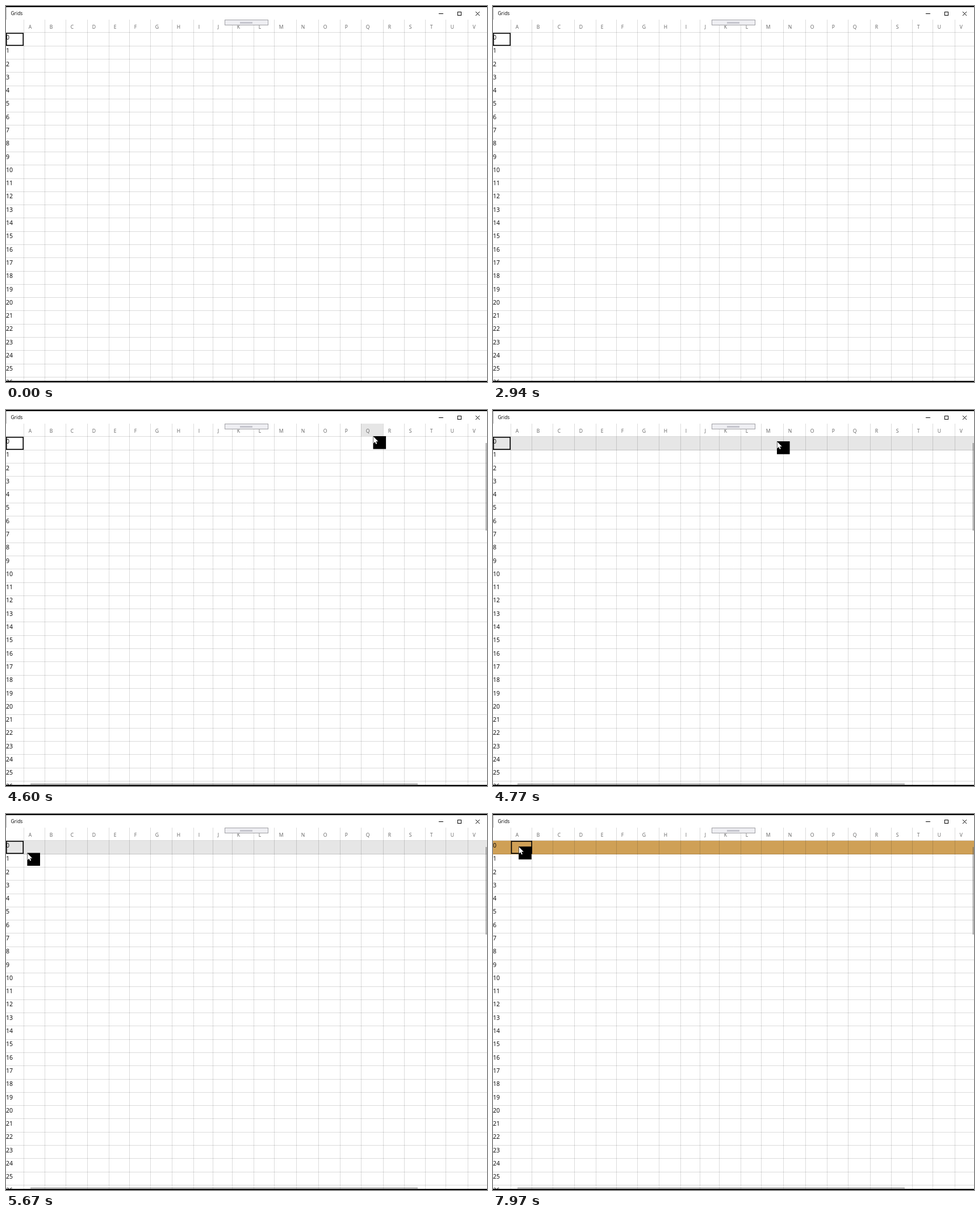
Recreate the animation shown at these times as an HTML page with a canvas. Size 847 by 661 pixels, loop 8 s.

```html
<!DOCTYPE html>
<html>
<head>
<meta charset="utf-8">
<style>
  html, body { margin: 0; width: 100%; height: 100%; overflow: hidden; background: #fff; }
  canvas { display: block; }
</style>
</head>
<body>
<canvas id="stage" width="847" height="661"></canvas>
<script>
const W = 847, H = 661, LOOP = 8000;
const HEADER_TOP = 24, ROW_HEIGHT = 23.29, ROWS = 27;
const LETTERS = [...'ABCDEFGHIJKLMNOPQRSTUV'];
const HEADER_SIZE = 8.6, HEADER_PADDING = 31.87;
const POINTER_TIME = 4070, SCROLLBAR_TIME = 4500, CLICK_TIME = 6370;

// The pointer rests between moves
const pointerStart = { x: 687, y: 11 };
const moves = [
  { start: 4400, duration: 200, x: 646.5, y: 46 },
  { start: 4600, duration: 440, x: 210, y: 73 },
  { start: 5310, duration: 360, x: 37.4, y: 68.4 },
  { start: 5670, duration: 300, x: 42.3, y: 55.4 },
  { start: 6540, duration: 70, x: 45.2, y: 57.2 }
];
const arrow = new Path2D('M0 0V11.6L2.7 9.2 4.4 13.2 6.2 12.4 4.5 8.5H8.2Z');
const ctx = document.getElementById('stage').getContext('2d');

const setFont = size => ctx.font = `${size}px "Open Sans", sans-serif`;
const rowTop = row => Math.floor(46.85 + ROW_HEIGHT * row);
const smooth = k => k * k * (3 - 2 * k);

// Each column is as wide as its padded header letter
function columnEdges() {
  setFont(HEADER_SIZE);
  const edges = [31];
  for (const letter of LETTERS) {
    edges.push(edges.at(-1) + HEADER_PADDING + ctx.measureText(letter).width);
  }
  return edges.map(Math.floor);
}
const columns = columnEdges();

function fill(color, x, y, w, h) {
  ctx.fillStyle = color;
  ctx.fillRect(x, y, w, h);
}

function outline(color, width, x, y, w, h) {
  ctx.strokeStyle = color;
  ctx.lineWidth = width;
  ctx.strokeRect(x, y, w, h);
}

function text(string, x, y, size, color) {
  setFont(size);
  ctx.fillStyle = color;
  ctx.fillText(string, x, y);
}

function pointerAt(time) {
  let { x, y } = pointerStart;
  for (const move of moves) {
    if (time < move.start) break;
    const k = smooth(Math.min(1, (time - move.start) / move.duration));
    x += (move.x - x) * k;
    y += (move.y - y) * k;
  }
  return { x, y };
}

function fillRow(row, color) {
  fill(color, 0, rowTop(row) + 1, W, rowTop(row + 1) - rowTop(row));
}

function drawHover({ x, y }) {
  if (y < HEADER_TOP) return;
  if (y > rowTop(0) + 1) {
    fillRow(y < rowTop(1) ? 0 : 1, '#e6e6e6');
  } else {
    const col = columns.findIndex(edge => edge > x) - 1;
    fill('#e6e6e6', columns[col], HEADER_TOP, columns[col + 1] - columns[col], rowTop(0) - HEADER_TOP);
  }
}

function drawGrid() {
  ctx.beginPath();
  for (const x of columns) {
    ctx.moveTo(x + .5, HEADER_TOP);
    ctx.lineTo(x + .5, 659);
  }
  for (let row = 0; row < ROWS; row++) {
    ctx.moveTo(0, rowTop(row) + .5);
    ctx.lineTo(W, rowTop(row) + .5);
  }
  ctx.lineWidth = 1;
  ctx.strokeStyle = 'rgba(0,0,0,.14)';
  ctx.stroke();

  LETTERS.forEach((letter, i) => text(letter, columns[i] + 8.8, 39.7, HEADER_SIZE, '#606060'));
  for (let row = 0; row < ROWS; row++) text(row, 0, 59 + ROW_HEIGHT * row, 10.5, '#000');
}

function drawFocus(left, right) {
  outline('#000', 1.6, left + .8, 48, right - left - 1.6, 21.2);
}

function drawScrollbars() {
  fill('#606060', 845, 58, 1, 154);
  fill('#606060', 43, 657, 682, 1);
}

function drawWindow() {
  text('Grids', 8.5, 16.3, 8.4, '#000');
  fill('#bbb', 0, 2, 1, 22);
  fill('#000', 762, 13, 8, 1);
  outline('#000', 1, 795.5, 10.5, 6, 6);
  ctx.beginPath();
  ctx.moveTo(827, 10); ctx.lineTo(834, 17);
  ctx.moveTo(834, 10); ctx.lineTo(827, 17);
  ctx.stroke();

  fill('#eeeef2', 385, 24, 77, 10);
  outline('#a0a0a4', 1, 385.5, 24.5, 76, 9);
  fill('#c4c4cc', 412, 28, 22, 3);

  fill('#000', 0, 0, W, 2);
  fill('#000', 0, 659, W, 2);
}

function drawPointer({ x, y }) {
  fill('#000', x, y, 22.6, 22.6);
  ctx.save();
  ctx.translate(x + .6, y + .8);
  ctx.fillStyle = '#fff';
  ctx.fill(arrow);
  ctx.restore();
}

function draw() {
  const time = performance.now() % LOOP;
  const pointer = pointerAt(time);
  const selected = time >= CLICK_TIME;

  fill('#fff', 0, 0, W, H);
  if (selected) fillRow(0, '#cfa056');
  else drawHover(pointer);
  drawGrid();
  drawFocus(selected ? columns[0] + .7 : 0, selected ? columns[1] + 1 : columns[0]);
  if (time >= SCROLLBAR_TIME) drawScrollbars();
  drawWindow();
  if (time >= POINTER_TIME) drawPointer(pointer);
  requestAnimationFrame(draw);
}
draw();
</script>
</body>
</html>
```
